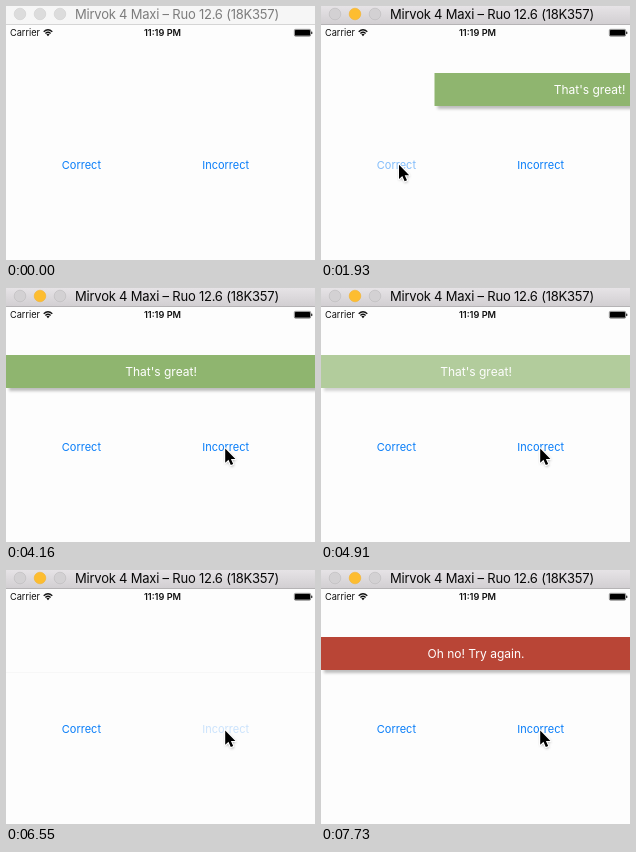
Animation of 309 by 254 pixels, one loop 8000 ms. Source, as an HTML page:

```html
<!DOCTYPE html>
<html lang="en">
<head>
<meta charset="utf-8">
<title>Alert demo</title>
<style>
  html, body { margin: 0; width: 100%; height: 100%; overflow: hidden; background: #fdfdfd; }
  svg { display: block; }
  text { font-family: Inter, Roboto, sans-serif; }
  .button { font-size: 11px; fill: #087df8; }
  .message { font-size: 12px; fill: #fff; text-anchor: middle; }
  .status { font-size: 9.2px; fill: #111; }
</style>
</head>
<body>
<svg width="309" height="254" viewBox="0 0 309 254">
  <defs>
    <linearGradient id="chrome" x2="0" y2="1">
      <stop stop-color="#e6e3e6"/>
      <stop offset="1" stop-color="#d2cfd2"/>
    </linearGradient>
    <filter id="soft" x="-20%" y="-30%" width="140%" height="160%">
      <feGaussianBlur stdDeviation="1.4"/>
    </filter>
    <path id="arrow" d="M0 0V14.3L3.3 11.3 5.6 16.6 8 15.6 5.7 10.5H10.2Z"/>
  </defs>
  <rect width="309" height="254" fill="#fdfdfd"/>

  <g id="titlebar">
    <rect id="bar" width="309" height="18"/>
    <rect id="edge" y="18" width="309" height="1"/>
    <circle class="light" cx="14" cy="8" r="5.8"/>
    <circle class="light" cx="34" cy="8" r="5.8"/>
    <circle class="light" cx="54" cy="8" r="5.8"/>
    <text id="title" x="69" y="13" font-size="13" letter-spacing="-0.22">Mirvok 4 Maxi – Ruo 12.6 (18K357)</text>
  </g>

  <g class="status">
    <text x="4" y="30.2">Carrier</text>
    <path d="M37.7 25.7Q42 21.8 46.3 25.7M39.4 27.4Q42 25.1 44.6 27.4" fill="none" stroke="#111" stroke-width="1.3"/>
    <path d="M40.4 28.5Q42 27.2 43.6 28.5L42 30.2Z"/>
    <text x="156.5" y="30.2" font-weight="600" text-anchor="middle">11:19 PM</text>
    <rect x="288.3" y="23.3" width="16.4" height="7" rx="1.3" fill="#aaa" stroke="#555" stroke-width=".5"/>
    <rect x="289" y="24" width="15" height="5.6" rx=".6" fill="#000"/>
    <rect x="305.2" y="25.5" width="1.1" height="2.6" rx=".5"/>
  </g>

  <rect id="trace" y="102" width="309" height="1" fill="#f7f7f7"/>
  <g id="banner">
    <rect x="3" y="70" width="312" height="33" fill="#000" opacity=".25" filter="url(#soft)"/>
    <rect id="panel" y="67" width="309" height="33"/>
    <text id="message" class="message" x="155" y="88"></text>
  </g>

  <text id="correct" class="button" x="55.8" y="163">Correct</text>
  <text id="incorrect" class="button" x="196.2" y="163">Incorrect</text>

  <g id="cursor">
    <use href="#arrow" x=".5" y="1.3" opacity=".5" filter="url(#soft)"/>
    <use href="#arrow" stroke="#fff" stroke-width="2.2" stroke-linejoin="round"/>
    <use href="#arrow"/>
  </g>
</svg>
<script>
const LOOP = 8000, TICK = 148.4;
const $ = id => document.getElementById(id);
const lights = document.querySelectorAll('.light');
const attrs = (node, values) => {
  for (const key in values) node.setAttribute(key, values[key]);
};
const show = (node, alpha) => node.setAttribute('opacity', alpha);

// Screen updates counted since a start time, the first one being 0.
const ticks = (t, start) => Math.floor((t - start) / TICK + 0.02);
const progress = (t, start) => Math.min(1, (ticks(t, start) + 1) / 7);

const alerts = [
  { press: 1780, enter: 1930, color: '#8fb56f', text: "That's great!", button: $('correct') },
  { press: 6550, enter: 6840, color: '#b94536', text: 'Oh no! Try again.', button: $('incorrect') }
];
const recovery = [0.5, 0.85];

function buttonAlpha(t, { press, enter }) {
  if (t < press) return 1;
  if (t < enter) return 0.2;
  return recovery[ticks(t, enter)] ?? 1;
}

function bannerAlpha(t) {
  if (t < 1930 || (t >= 5200 && t < 6840)) return 0;
  if (t >= 4910 && t < 5200) return t < 5050 ? 0.68 : 0.3;
  return 1;
}

function cursorPosition(t) {
  if (t < 3270) {
    const rest = (1 - progress(t, 440)) ** 1.8;
    return [78 + 43 * rest, 158.7 + 108 * rest];
  }
  const p = progress(t, 3270), eased = p * p * (3 - 2 * p);
  return [78 + 141.2 * eased, 158.7 + 1.8 * eased + 9 * Math.sin(Math.PI * eased)];
}

function draw(t) {
  const active = t >= 1780;
  attrs($('bar'), { fill: active ? 'url(#chrome)' : '#f6f6f6' });
  attrs($('edge'), { fill: active ? '#b5b3b5' : '#d5d5d5' });
  attrs($('title'), { fill: active ? '#080808' : '#7c7c7c' });
  const fills = active ? ['#d3d1d3', '#fdbd30', '#d3d1d3'] : Array(3).fill('#dcdcdc');
  const strokes = active ? ['#bcbabc', '#f3b22e', '#bcbabc'] : Array(3).fill('#cecece');
  lights.forEach((light, i) => attrs(light, { fill: fills[i], stroke: strokes[i], 'stroke-width': 0.6 }));

  const alert = alerts[t < alerts[1].enter ? 0 : 1];
  const x = t < alert.enter ? 309 : 113.5 * 0.36 ** ticks(t, alert.enter);
  attrs($('banner'), { transform: `translate(${x < 0.4 ? 0 : x.toFixed(2)} 0)` });
  attrs($('panel'), { fill: alert.color });
  $('message').textContent = alert.text;
  show($('banner'), bannerAlpha(t));
  show($('trace'), t >= 5200 && t < 6840 ? 1 : 0);
  alerts.forEach(item => show(item.button, buttonAlpha(t, item)));

  const [cx, cy] = cursorPosition(t);
  attrs($('cursor'), { transform: `translate(${cx.toFixed(2)} ${cy.toFixed(2)})` });
  show($('cursor'), t < 440 ? 0 : 1);
}

const start = performance.now();
function frame() {
  draw((performance.now() - start) % LOOP);
  requestAnimationFrame(frame);
}
frame();
</script>
</body>
</html>
```
